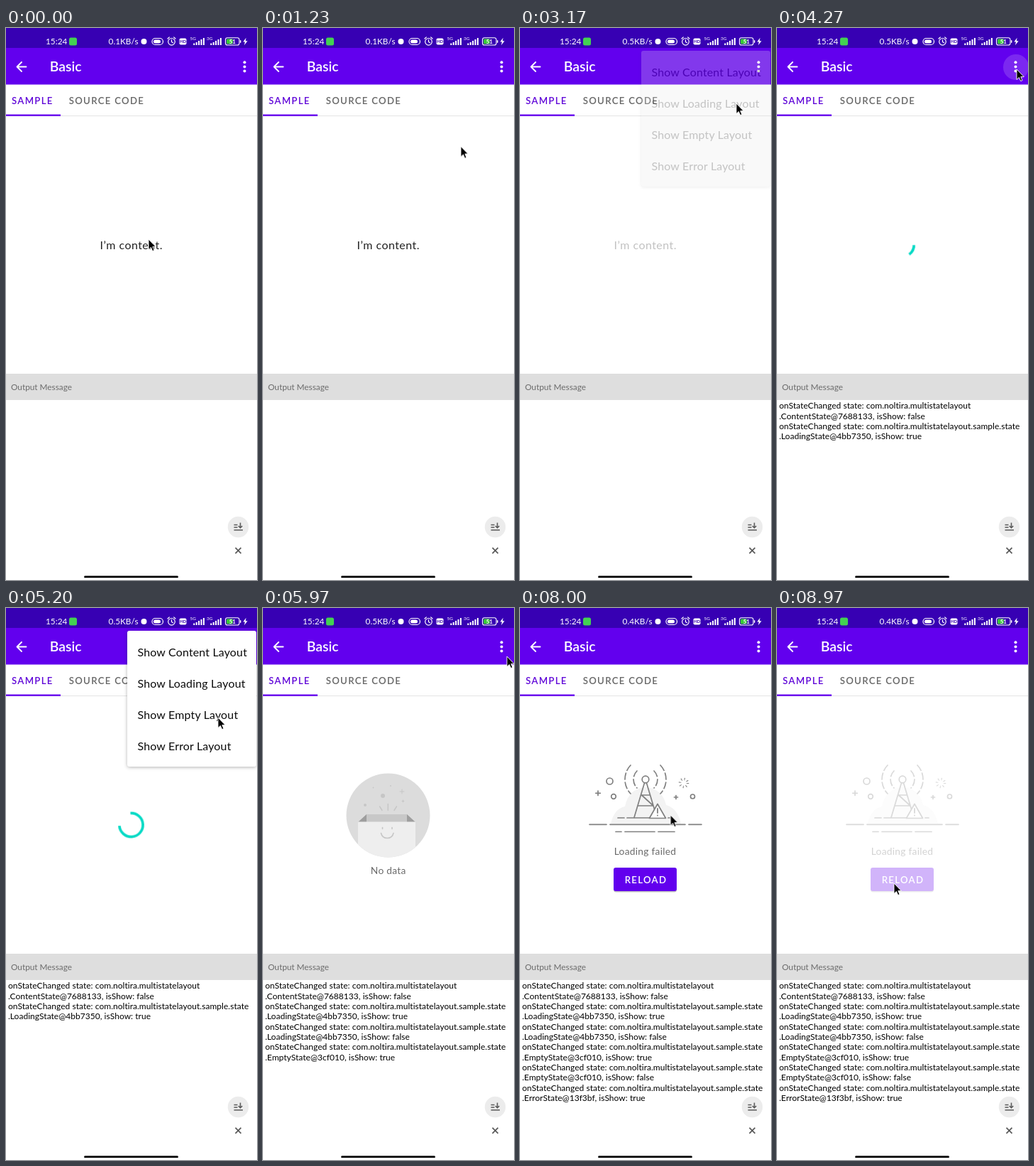
Animation, 354 px wide and 776 px high, one loop 9.01 s. Source, as an HTML page:

```html
<!DOCTYPE html>
<html lang="en">
<head>
<meta charset="utf-8">
<title>Multi-state layout demo</title>
<style>
html, body { margin: 0; width: 100%; height: 100%; overflow: hidden; background: #fff; }
svg { display: block; width: 100vw; height: 100vh; font-family: Lato, "Open Sans", sans-serif; }
.line { fill: none; stroke-linecap: round; stroke-linejoin: round; }
.small { font-size: 11.8px; }
.tiny { font-size: 6.5px; }
.caps { font-size: 13.2px; font-weight: 600; letter-spacing: 1.3px; }
.note { font-size: 13.8px; letter-spacing: .25px; fill: #6a6a6a; }
.mid { text-anchor: middle; }
.end { text-anchor: end; }

/* One shared loop; every percentage is a share of 9010 ms */
.loop { animation: 9010ms linear infinite both; }
.step { animation-timing-function: step-end; }

#speed1 { animation-name: speed1; }
#speed2 { animation-name: speed2; }
#speed3 { animation-name: speed3; }
@keyframes speed1 { 0% { opacity: 1 } 33.3%, 100% { opacity: 0 } }
@keyframes speed2 { 0% { opacity: 0 } 33.3% { opacity: 1 } 75.5%, 100% { opacity: 0 } }
@keyframes speed3 { 0% { opacity: 0 } 75.5%, 100% { opacity: 1 } }

#content { animation-name: content; }
#loading { animation-name: loading; }
#empty { animation-name: empty; }
#error { animation-name: error; }
@keyframes content { 0%, 33.19% { opacity: 1 } 35.96%, 100% { opacity: 0 } }
@keyframes loading { 0%, 36.07% { opacity: 0 } 38.85%, 58.93% { opacity: 1 } 61.71%, 100% { opacity: 0 } }
@keyframes empty { 0%, 61.82% { opacity: 0 } 64.59%, 80.69% { opacity: 1 } 83.46%, 100% { opacity: 0 } }
@keyframes error { 0%, 83.57% { opacity: 0 } 86.35%, 97.61% { opacity: 1 } 100% { opacity: .14 } }

#spin { transform-origin: 176.5px 305px; animation-name: spin; }
#arc { animation-name: arc; animation-timing-function: cubic-bezier(.4, 0, .2, 1); }
@keyframes spin { 0%, 36.13% { transform: rotate(-90deg) } 100% { transform: rotate(1231deg) } }
@keyframes arc {
  0%, 36.13% { stroke-dasharray: 0 100; stroke-dashoffset: 0 }
  43.52% { stroke-dasharray: 75 25; stroke-dashoffset: 0 }
  50.92% { stroke-dasharray: 0 100; stroke-dashoffset: -75 }
  58.32% { stroke-dasharray: 75 25; stroke-dashoffset: -75 }
  65.72%, 100% { stroke-dasharray: 0 100; stroke-dashoffset: -150 }
}

#log { font-size: 12px; letter-spacing: .03px; fill: #000; }
#log1 { animation-name: log1; }
#log2 { animation-name: log2; }
#log3 { animation-name: log3; }
@keyframes log1 { 0% { opacity: 0 } 36%, 100% { opacity: 1 } }
@keyframes log2 { 0% { opacity: 0 } 61.8%, 100% { opacity: 1 } }
@keyframes log3 { 0% { opacity: 0 } 83.5%, 100% { opacity: 1 } }

#ripple { transform-origin: 337px 55px; animation-name: ripple; }
@keyframes ripple {
  0%, 20.87% { opacity: 0; transform: scale(.5) }
  21.64%, 22.09% { opacity: .16; transform: none }
  24.75% { opacity: 0; transform: none }
  46.05% { opacity: 0; transform: none }
  46.06% { opacity: 0; transform: scale(.5) }
  47.17%, 47.72% { opacity: .16; transform: none }
  50.5% { opacity: 0; transform: none }
  68.58% { opacity: 0; transform: none }
  68.59% { opacity: 0; transform: scale(.5) }
  69.37%, 69.92% { opacity: .16; transform: none }
  72.7%, 100% { opacity: 0; transform: none }
}

/* The menu slides and unclips out of the dots, then fades with its shadow showing through */
#menu { position: absolute; left: 171px; top: 32px; width: 182px; height: 191px; }
#menuFade { animation-name: menuFade; filter: drop-shadow(0 1.5px 2.5px rgba(0, 0, 0, .3)); }
#menuSlide { animation-name: menuSlide; animation-timing-function: cubic-bezier(0, 0, .2, 1); }
#sheet {
  box-sizing: border-box; height: 191px; padding: 7.5px 0 0 14.5px;
  border-radius: 3px; animation-name: tint;
  font: 16px/44px Lato, "Open Sans", sans-serif; letter-spacing: .15px; color: #0c0c0c; white-space: nowrap;
}
@keyframes menuFade {
  0%, 21.81% { opacity: 0 } 22.4%, 33.19% { opacity: 1 } 35.85% { opacity: 0 }
  47.72% { opacity: 0 } 48.3%, 58.82% { opacity: 1 } 61.48% { opacity: 0 }
  69.92% { opacity: 0 } 70.5%, 80.91% { opacity: 1 } 83.57%, 100% { opacity: 0 }
}
@keyframes tint {
  0%, 33.19% { background: #fff } 34.1%, 47.71% { background: #e4e4e4 }
  47.72%, 58.82% { background: #fff } 59.7%, 69.91% { background: #e4e4e4 }
  69.92%, 80.91% { background: #fff } 81.8%, 100% { background: #e4e4e4 }
}
@keyframes menuSlide {
  0%, 21.81% { transform: translate(74px, -73px); clip-path: inset(73px 0 110px 55px) }
  24.58%, 47.71% { transform: none; clip-path: inset(0 0 0 0) }
  47.72% { transform: translate(74px, -73px); clip-path: inset(73px 0 110px 55px) }
  50.5%, 69.91% { transform: none; clip-path: inset(0 0 0 0) }
  69.92% { transform: translate(74px, -73px); clip-path: inset(73px 0 110px 55px) }
  72.7%, 100% { transform: none; clip-path: inset(0 0 0 0) }
}

#pointer { position: absolute; left: 0; top: 0; width: 14px; height: 20px; overflow: visible; animation-name: pointer; animation-timing-function: ease-in-out; }
@keyframes pointer {
  0%, 7.77% { transform: translate(201px, 297px) }
  18.87%, 27.19% { transform: translate(342px, 61px) }
  32.19%, 37.74% { transform: translate(305px, 106px) }
  43.84%, 50.5% { transform: translate(338px, 58px) }
  56.05%, 59.16% { transform: translate(299px, 154px) }
  66.26% { transform: translate(344px, 68px) }
  68.26%, 73.25% { transform: translate(339px, 58px) }
  79.36%, 85.46% { transform: translate(260px, 194px) }
  92.12%, 100% { transform: translate(165px, 387px) }
}
</style>
</head>
<body>
<svg viewBox="0 0 354 776">
  <defs>
    <clipPath id="disc"><circle cx="176.5" cy="291.5" r="59"/></clipPath>
    <path id="bars" d="M.8 10.5v-2.5M4.2 10.5v-4M7.6 10.5v-6M11 10.5v-8M14.4 10.5v-10" stroke="#fff" stroke-width="2"/>
  </defs>
  <rect width="354" height="776" fill="#fff"/>

  <!-- Status bar -->
  <rect width="354" height="28.5" fill="#3700b3"/>
  <g fill="#fff">
    <text class="small" x="56" y="23">15:24</text>
    <rect x="89" y="13.5" width="11" height="11" rx="2.5" fill="#43d152"/>
    <g class="small end">
      <text id="speed1" class="loop step" x="186.5" y="23">0.1KB/s</text>
      <text id="speed2" class="loop step" x="186.5" y="23">0.5KB/s</text>
      <text id="speed3" class="loop step" x="186.5" y="23">0.4KB/s</text>
    </g>
    <circle cx="194.5" cy="19" r="4"/>
    <rect x="206" y="14.5" width="15.5" height="9" rx="4.5" fill="none" stroke="#fff" stroke-width="1.2"/>
    <rect x="208" y="16.5" width="10" height="5" rx="2.5"/>
    <g class="line" stroke="#fff" stroke-width="1.2">
      <circle cx="233.5" cy="19.3" r="4.8"/>
      <path d="M233.5 16.5v3l2 1.2M228 15l2.3-2M239 15l-2.3-2"/>
    </g>
    <rect x="244.5" y="14.5" width="10" height="9" rx="2"/>
    <text class="mid" x="249.5" y="21.3" font-size="6" font-weight="700" fill="#3700b3">HD</text>
    <text class="tiny" x="259.5" y="16.8">5G</text>
    <text class="tiny" x="283" y="16.8">3G</text>
    <use href="#bars" x="264.5" y="13.5"/>
    <use href="#bars" x="288.5" y="13.5"/>
    <rect x="309.5" y="13.8" width="19.5" height="10.2" rx="2.8" fill="none" stroke="#fff" stroke-width="1.1"/>
    <rect x="311" y="15.3" width="9" height="7.2" rx="1.5" fill="#37c837"/>
    <rect x="330" y="17" width="1.4" height="4" rx=".7"/>
    <text class="mid" x="319.3" y="21.8" font-size="8" font-weight="700">51</text>
    <path d="M338.6 13.8l-4.2 5.8h2.6l-1 4.6 4.6-6h-2.8z"/>
  </g>

  <!-- App bar -->
  <rect y="28" width="354" height="51.5" fill="#6200ee"/>
  <path class="line" d="M28.5 54.5H16M22 48l-6.5 6.5 6.5 6.5" stroke="#fff" stroke-width="1.8"/>
  <text x="61.8" y="61.2" font-size="19.4" font-weight="600" fill="#fff">Basic</text>
  <circle id="ripple" class="loop" cx="337" cy="55" r="18" fill="#fff"/>
  <g fill="#fff">
    <circle cx="336.5" cy="48.3" r="2"/><circle cx="336.5" cy="54.4" r="2"/><circle cx="336.5" cy="60.5" r="2"/>
  </g>

  <!-- Tabs -->
  <rect y="123" width="354" height="1" fill="#e4e4e4"/>
  <rect y="121.5" width="77" height="2.3" fill="#6200ee"/>
  <text class="caps" x="8" y="106.6" fill="#5f05d8">SAMPLE</text>
  <text class="caps" x="88.7" y="106.6" fill="#666">SOURCE CODE</text>

  <!-- States -->
  <text id="content" class="loop mid" x="176.7" y="310.8" font-size="16" letter-spacing=".45" fill="#222">I’m content.</text>

  <g id="loading" class="loop">
    <g id="spin" class="loop">
      <circle id="arc" class="loop" cx="176.5" cy="305" r="16.6" pathLength="100" fill="none" stroke="#03dac5" stroke-width="3.7"/>
    </g>
  </g>

  <g id="empty" class="loop">
    <circle cx="176.5" cy="291.5" r="59" fill="#dcdcdc"/>
    <g clip-path="url(#disc)">
      <path d="M146 290H203V302H146z" fill="#c8c8c8"/>
      <path d="M146 290L134 301H146zM203 290L215 301H203z" fill="#9e9e9e"/>
      <rect x="134" y="300.5" width="81" height="51" fill="#eee"/>
    </g>
    <g class="line" stroke="#c6c6c6" stroke-width="1.6">
      <path d="M168.5 308.5v2M182 308.5v2M166.5 316.5Q168 323.5 175.2 323.5T184 316.5"/>
      <path d="M176.3 275.5v9M164.5 279l3.5 5.5M188.5 279l-3.5 5.5" stroke-width="1.4"/>
      <path d="M196 255v6M193 258h6M197.5 270v3M196 271.5h3" stroke-width="1"/>
    </g>
    <g fill="#c6c6c6">
      <circle cx="169" cy="264" r="3"/><circle cx="144" cy="277" r="2"/>
      <circle cx="155.5" cy="252.5" r=".9"/><circle cx="180" cy="250" r=".9"/>
    </g>
    <text class="note mid" x="176.7" y="373.8">No data</text>
  </g>

  <g id="error" class="loop">
    <path d="M128 303Q133 282 148 279Q153 254 177 252Q201 254 206 277Q222 281 227 303z" fill="#f3f3f3"/>
    <g class="line" stroke="#808080" stroke-width="1.7">
      <path d="M98 304.3H122M127 304.3H233M238 304.3H256M135 314.5H143M148 314.5H190M195 314.5H218M138 295H147M151 295H204M209 295H214"/>
      <circle cx="177" cy="241" r="4.8"/>
      <path d="M175.5 246L161 294.5M178.5 246L193 294.5M171.5 263L183.5 263M167 278L188 278M171.5 263L188 278"/>
      <path d="M165 229A17 17 0 0 0 165 253M189 229A17 17 0 0 1 189 253M156 221A29 29 0 0 0 156 261M198 221A29 29 0 0 1 198 261" stroke-dasharray="9 4"/>
      <circle cx="126.5" cy="243.5" r="4.5"/><circle cx="132" cy="265" r="3.3"/><circle cx="243.5" cy="265" r="3"/>
      <path d="M110 257v6.5M106.8 260.3h6.5M220 263.5v5M217.5 266h5"/>
      <circle cx="231" cy="246" r="5.5" stroke-width="3.5" stroke-dasharray="1 3.32" stroke-linecap="butt"/>
      <path d="M194 275.5L205.5 295.5H182.5z" fill="#fff"/>
      <path d="M194 282v6M194 291.5v.2" stroke-width="1.8"/>
    </g>
    <text class="note mid" x="176.5" y="347">Loading failed</text>
    <rect x="132" y="366.5" width="89" height="33" rx="3.5" fill="#000" opacity=".25"/>
    <rect x="132" y="365" width="89" height="33" rx="3" fill="#6200ee"/>
    <text class="caps mid" x="177.5" y="387" fill="#fff">RELOAD</text>
  </g>

  <!-- Output -->
  <rect y="486" width="354" height="37" fill="#dedede"/>
  <text class="small" x="7" y="509" fill="#6c6c6c">Output Message</text>
  <g id="log">
    <text id="log1" class="loop step" y="535.2">
      <tspan x="3">onStateChanged state: com.noltira.multistatelayout</tspan>
      <tspan x="3" dy="14.35">.ContentState@7688133, isShow: false</tspan>
      <tspan x="3" dy="14.35">onStateChanged state: com.noltira.multistatelayout.sample.state</tspan>
      <tspan x="3" dy="14.35">.LoadingState@4bb7350, isShow: true</tspan>
    </text>
    <text id="log2" class="loop step" y="592.6">
      <tspan x="3">onStateChanged state: com.noltira.multistatelayout.sample.state</tspan>
      <tspan x="3" dy="14.35">.LoadingState@4bb7350, isShow: false</tspan>
      <tspan x="3" dy="14.35">onStateChanged state: com.noltira.multistatelayout.sample.state</tspan>
      <tspan x="3" dy="14.35">.EmptyState@3cf010, isShow: true</tspan>
    </text>
    <text id="log3" class="loop step" y="650">
      <tspan x="3">onStateChanged state: com.noltira.multistatelayout.sample.state</tspan>
      <tspan x="3" dy="14.35">.EmptyState@3cf010, isShow: false</tspan>
      <tspan x="3" dy="14.35">onStateChanged state: com.noltira.multistatelayout.sample.state</tspan>
      <tspan x="3" dy="14.35">.ErrorState@13f3bf, isShow: true</tspan>
    </text>
  </g>

  <circle cx="327.5" cy="701.5" r="14.7" fill="#ececec"/>
  <path d="M321.5 698.5h5M321.5 702h5M321.5 705.7h12.5M330.5 695.5v7M327.8 700l2.7 2.7 2.7-2.7" fill="none" stroke="#5a5a5a" stroke-width="1.6"/>
  <path d="M323.5 730.7l8 8M331.5 730.7l-8 8" stroke="#5a5a5a" stroke-width="1.7"/>
  <rect x="110" y="770" width="133" height="3" rx="1.5" fill="#1c1c1c"/>
</svg>

<div id="menu">
  <div id="menuFade" class="loop">
    <div id="menuSlide" class="loop">
      <div id="sheet" class="loop">Show Content Layout<br>Show Loading Layout<br>Show Empty Layout<br>Show Error Layout</div>
    </div>
  </div>
</div>

<svg id="pointer" class="loop" viewBox="0 0 14 20">
  <path d="M0 0V14.5L3.4 11.4L5.7 16.6L8 15.6L5.8 10.6H10.2z" stroke="#fff" stroke-width=".9"/>
</svg>
</body>
</html>
```
